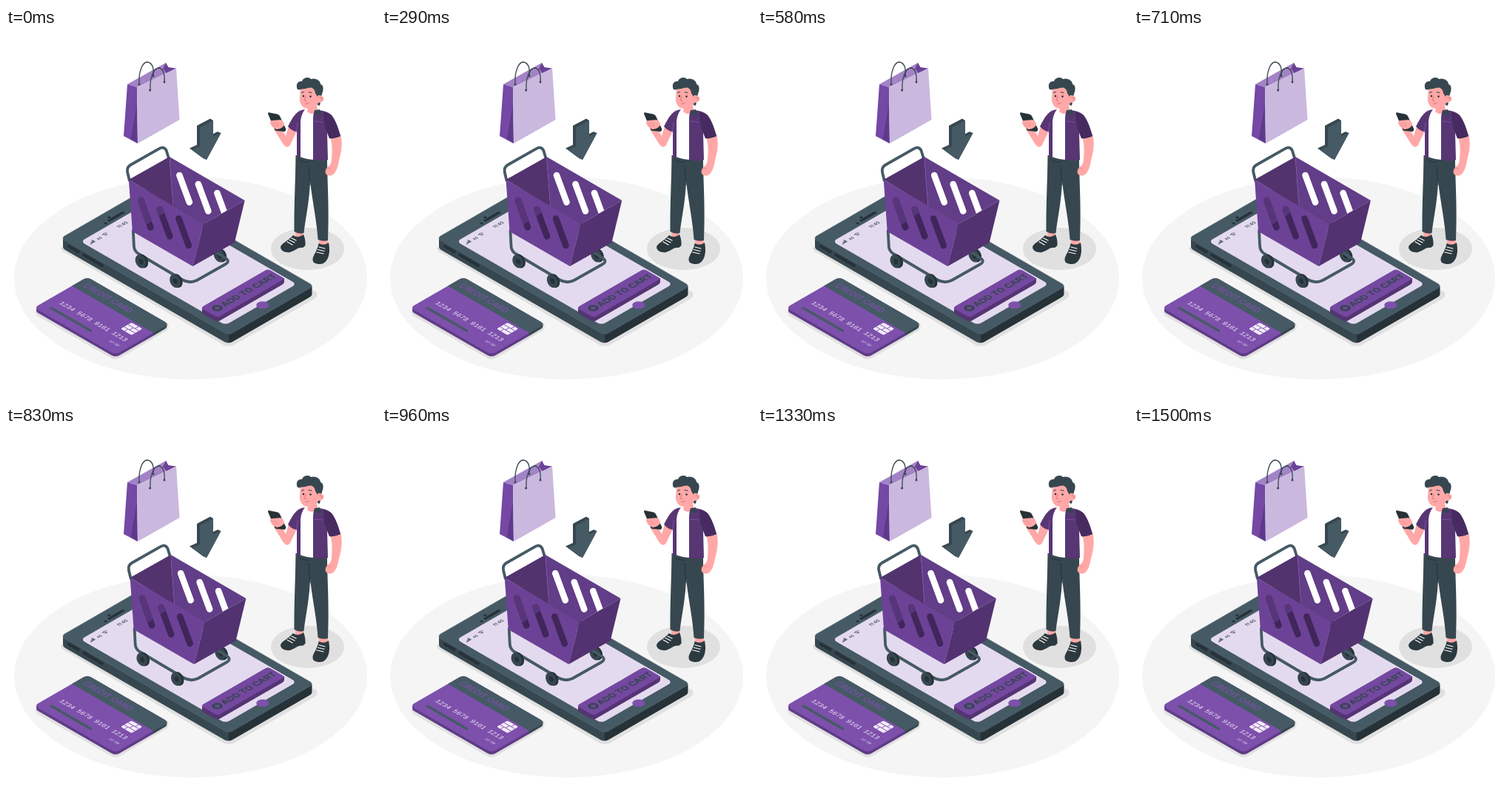
Animation of 500 by 500 pixels, one loop 1.54 s. Source, as an HTML page:

```html
<!DOCTYPE html>
<html lang="en">
<head>
<meta charset="utf-8">
<title>Add to cart</title>
<style>
  html, body { margin: 0; width: 100%; height: 100%; overflow: hidden; background: #fff; }
  svg { display: block; width: 100%; height: 100%; }
  text { font-family: Inter, Roboto, sans-serif; }
  .mono { font-family: "Liberation Mono", monospace; fill: #f3ecfa; }
  .line { fill: none; stroke-linecap: round; stroke-linejoin: round; }
  .slate { fill: #455a64; }
  .dark { fill: #37474f; }
  .ink { fill: #263238; }
  .skin { fill: #ffa8a7; }
</style>
</head>
<body>
<svg viewBox="0 0 500 500">
  <defs>
    <g id="wheel">
      <ellipse cx="1.5" cy=".8" rx="7.2" ry="9.800" transform="rotate(-24)" class="ink"/>
      <ellipse cx="-1" rx="6.800" ry="9.400" transform="rotate(-24)" class="dark"/>
      <ellipse cx="-.6" cy=".4" rx="2.8" ry="4" transform="rotate(-24)" class="ink"/>
    </g>
    <clipPath id="backWall"><path d="M221 174L322.500 233L267 265L226 241Z"/></clipPath>
    <clipPath id="wallSeen"><path d="M166 205L267 265L267 215L182 271L166 282Z"/></clipPath>
    <path id="slots" d="M182.500 233L195.500 269.500M208 245L221.500 281.500M233.500 257.500L247 294"/>
  </defs>

  <ellipse cx="249.500" cy="338" rx="238.500" ry="137" fill="#f5f5f5"/>
  <ellipse cx="407.500" cy="298.500" rx="49.500" ry="28.500" fill="#e0e0e0"/>

  <!-- phone -->
  <path d="M74 296Q74 301 80 304L293 428Q301 432 309 428L417 366Q422 363 420 357L300 300Z" fill="#e0e0e0"/>
  <path class="dark" d="M77 284V296Q77 298.500 80 300L295 424Q298 425.500 301 425.500V380Z"/>
  <path class="ink" d="M301 425.500Q304 425.500 307 423.500L410 364Q413.500 362 413.500 360V348.500L301 390Z"/>
  <path class="line" d="M85 295L98 302.500M105 306.500L130 321" stroke="#263238" stroke-width="4"/>
  <g transform="matrix(.866 .5 .866 -.5 74 284)">
    <rect width="262" height="133" rx="6" class="slate" stroke="#5b7079" stroke-width=".5"/>
    <rect x="20" y="11" width="226" height="111" rx="6" fill="#e4daef"/>
    <circle cx="248" cy="67" r="7" fill="#7d50ac"/>
    <g class="ink">
      <rect x="12" y="60" width="4" height="25" rx="2"/>
      <circle cx="15" cy="55" r="1.800"/>
      <circle cx="9.500" cy="66" r="1.800"/>
    </g>
    <g transform="matrix(0 1 1 0 32 15)" class="dark" font-size="6" font-weight="600">
      <path d="M0 0v-1.300h1.300v1.300zM2 0v-2.600h1.300v2.600zM4 0v-3.900h1.300v3.900zM6 0v-5.200h1.300v5.200z"/>
      <text x="11.500" font-size="4.800">4G</text>
      <path class="line" d="M22 -3.500q3-2.300 6 0M23.500 -1.800q1.500-1.300 3 0" stroke="#37474f" stroke-width="1"/>
      <circle cx="25" cy="-.4" r=".7"/>
      <text x="44">11:45</text>
    </g>
  </g>

  <!-- call to action -->
  <path d="M265 378V384Q265 386 268 387.500L283 396Q286 397 289 395.500L373 347Q376 345.500 376 343V338Z" fill="#553473"/>
  <g transform="matrix(.866 .5 .866 -.5 263 378)">
    <rect width="26.500" height="105" rx="4" fill="#7448a0"/>
    <g transform="matrix(0 1 1 0 13.500 12.500)">
      <circle r="6" class="dark"/>
      <path d="M-3.300 0H3.300M0 -3.300V3.300" stroke="#7448a0" stroke-width="2"/>
      <text x="7.500" y="4.500" font-size="12" font-weight="700" class="dark">ADD TO CART</text>
    </g>
  </g>

  <!-- bank card -->
  <path d="M39 383Q40 388 44 390L142 446Q148 449 154 446L217 409Q221 405 219 399Z" fill="#e0e0e0"/>
  <path d="M41 378V382Q41 384 44 385.500L143 442.500Q148 445 153 442.500L199 416V390Z" fill="#5f3b86"/>
  <path class="dark" d="M199 404V416L215 406.500Q217.500 405 217.500 402V399.500Z"/>
  <g transform="matrix(.866 .5 .866 -.5 38 378)">
    <rect width="127" height="83" rx="6" fill="#7d50ac"/>
    <path class="slate" d="M0 59H127V77Q127 83 121 83H6Q0 83 0 77Z"/>
    <path class="line" d="M14 13H75" stroke="#455a64" stroke-width="4"/>
    <rect x="96" y="39" width="17" height="17" rx="2" fill="#f3ecfa"/>
    <path class="line" d="M96 44.500H113M96 50.500H113M102 39V44.500M107 50.500V56M104.500 44.500V50.500" stroke="#7d50ac" stroke-width=".9"/>
    <g transform="scale(1 -1)">
      <text x="8" y="-67" font-size="11" font-weight="500" fill="#7d50ac">CREDIT CARD</text>
      <text x="13" y="-25" font-size="9.100" class="mono">1234 5678 9101 1213</text>
      <text x="103" y="-13" font-size="5" class="mono">12:05</text>
    </g>
  </g>

  <!-- shopping bag -->
  <path d="M164 76L216 47L219 54L230 54.500L177 80Z" fill="#a383c6"/>
  <path d="M216 47L219.500 53L229.500 54.500L217 61L212 55Z" fill="#6c4296"/>
  <path class="line" d="M180 76C179 60 184 46 191 46C198 47 200 55 199 65" stroke="#37474f" stroke-width="1.300"/>
  <path d="M164 76L177 80L178 156L159 146Z" fill="#7448a4"/>
  <path d="M177 102V155.500L168.500 150.500Z" fill="#60398a"/>
  <path d="M177 80L230 54.500L234.500 124L178 156Z" fill="#cab8de"/>
  <path class="line" d="M195 84C194 68 199 55 206 54C212 54 215 62 214 73" stroke="#37474f" stroke-width="1.300"/>
  <g class="dark">
    <circle cx="180" cy="76" r="1.500"/><circle cx="199" cy="65" r="1.500"/>
    <circle cx="194.500" cy="84" r="1.500"/><circle cx="214" cy="73" r="1.500"/>
  </g>

  <!-- arrow -->
  <path class="dark" d="M258 132L276 122.500L280 125V143L286 140L290.500 142L271 178L267 176.500L248 162.500L258 158Z"/>
  <path class="slate" d="M262 134.500L280 125V146L290.500 142L271 178L252 164.500L262 160Z"/>

  <!-- shopper -->
  <g>
    <path class="skin" d="M391 272H402V286H391ZM423 284H435V296H423Z"/>
    <path fill="#2c393f" d="M371 296C372 291 381 288 388 280Q395 285 402 279Q405 286 404.500 294L401 297C394 296 391 301 384 303C377 304 371 301 371 296ZM414.500 312C415 307 421 301 422.500 291Q430 295 436 290Q438 300 436 308C434 314 431 319 424 319C418 319 414 317 414.500 312Z"/>
    <path class="line" d="M380 289L387 293M383 286.500L390 290M386 284L392 287M420 303L429 305M421.500 299.500L430 301.500M423 296L431 298" stroke="#fff" stroke-width="1.200"/>
    <path class="dark" d="M391.500 172L434 178C434 205 437 240 435 287Q428 289 421.500 286C420 260 414 235 411 207C410 235 405 255 402.500 277Q396 279 389.500 275C389 245 391 210 391.500 172Z"/>
    <path class="line" d="M411 212L409 186M396 178Q402 182 410 181" stroke="#263238" stroke-width="1"/>

    <path class="skin" d="M438 146L452 144C455 155 454 165 450 179C448 190 445 199 438 199.500C432 200 431 195 432 192L434 188C437 187 440 183 440 177C441 166 441 157 438 146Z"/>
    <path class="line" d="M432 191Q436 189 439 190" stroke="#e88787" stroke-width=".8"/>
    <path d="M402 112L419 111L418 178Q407 178 397 174Z" fill="#fff"/>
    <path class="skin" d="M409 104L420 101L421 113Q413 119 407 113Z"/>
    <path class="skin" d="M382 133L378 146L371 134L362 137L371 151C375 159 380 164 384 158L393 139Z"/>
    <path d="M404 110C393 111 388 119 381 133Q386 139 392 140L393 138V174L398 175L398 126Q399 116 404 110Z" fill="#583674"/>
    <path d="M417 111Q432 110 440 118C446 126 449 136 452 146Q444 150 437 149L434 141L435 178Q425 181 415 178L415 125Q415 116 417 111Z" fill="#583674"/>
    <path d="M429 113Q436 114 440 118C446 126 449 136 452 146Q444 150 437 149L430 130Z" fill="#472b60"/>
    <path class="line" d="M416 126L428 127M392.500 140L394 128" stroke="#7d50ac" stroke-width=".9"/>
    <path d="M418 111L424 110L427 119L420 116L416 121Z" class="dark"/>

    <path class="ink" d="M354.500 114L367 116.500Q369 117 370 119L378.500 137L377 140L366 139Q364 139 363 137L354 116Z"/>
    <path class="skin" d="M357 128Q356 125 360 125L371 124Q376 126 376 131Q374 136 366 137Q359 135 357 128Z"/>
    <path class="line" d="M359 129L367 129M360 132L368 132" stroke="#e88787" stroke-width=".7"/>

    <path class="dark" d="M394 83C391 77 394 71 400 72C402 66 410 66 412 69C418 67 425 71 425 76C430 77 429 85 427 89L424 105L421 104L418 86Z"/>
    <path class="skin" d="M398 81Q408 82 417 79Q418 88 421 91Q424 90 427 92C432 95 429 101 422 101C420 107 413 110 407 109C400 108 396 101 397 94Z"/>
    <path d="M396 83Q404 83 411 80Q417 81 418 88L421 93L425 80L414 74L399 76Z" class="dark"/>
    <path class="line" d="M399.500 87.500L402.500 86.500M409 86.500L413 87.500" stroke="#37474f" stroke-width="1.100"/>
    <path class="line" d="M405 93L403 98L406 98.500M404.500 102.500Q407.500 103 410 101M424 94Q427 93 427 97" stroke="#d96f74" stroke-width=".9"/>
    <circle cx="402" cy="92" r="1.300" class="ink"/><circle cx="411.500" cy="92.500" r="1.300" class="ink"/>
  </g>

  <!-- cart -->
  <g id="cart">
    <use href="#wheel" x="289" y="307"/>
    <g class="line" stroke="#455a64" stroke-width="3.800">
      <path d="M172 274L173 294Q173 301 179 305L238 340Q248 346 258 341L297 319Q303 315 297 311L286 304"/>
      <path d="M167 206L164.300 195Q163 188 168.500 185L207 163.200Q214 159 217 166L220 176"/>
    </g>
    <use href="#wheel" x="183" y="315"/>
    <use href="#wheel" x="229.500" y="341.500"/>
    <path d="M166 205L221 174L226 241Z" fill="#52336e"/>
    <path d="M221 174L322.800 233L267 265L226 241Z" fill="#623d88"/>
    <path d="M221 174L226 241" stroke="#7d50ac" stroke-width=".6"/>
    <path clip-path="url(#backWall)" class="line" d="M234.500 199L248 235.500M260 211L273.500 247.500M285.500 223L299 259.500" stroke="#fff" stroke-width="8.600"/>
    <path d="M166 205L267 265L252.500 322L171 275Z" fill="#6c4296"/>
    <path d="M267 265L322.800 233L309 290L252.500 322Z" fill="#523270"/>
    <g class="line" stroke-width="8.600">
      <use href="#slots" stroke="#40265a"/>
      <use href="#slots" stroke="#57357a" clip-path="url(#wallSeen)"/>
    </g>
  </g>
</svg>
<script>
  const LOOP = 1540, STEP = 1000 / 24, SHAKE = 1500, LEAD = 22;
  // horizontal offset at every tenth of the shake
  const stops = [0, -1, 2, -4, 4, -4, 4, -4, 2, -1, 0];
  const cart = document.getElementById('cart');

  function shakeX(ms) {
    const p = (ms % SHAKE) / SHAKE * 10;
    const i = Math.floor(p);
    return stops[i] + (stops[i + 1] - stops[i]) * (p - i);
  }

  // the shake advances at 24 poses per second
  function draw() {
    const t = performance.now() % LOOP;
    const pose = Math.min(36, Math.floor((t + 4) / STEP));
    cart.setAttribute('transform', `translate(${shakeX(pose * STEP + LEAD).toFixed(3)} 0)`);
    requestAnimationFrame(draw);
  }
  draw();
</script>
</body>
</html>
```
